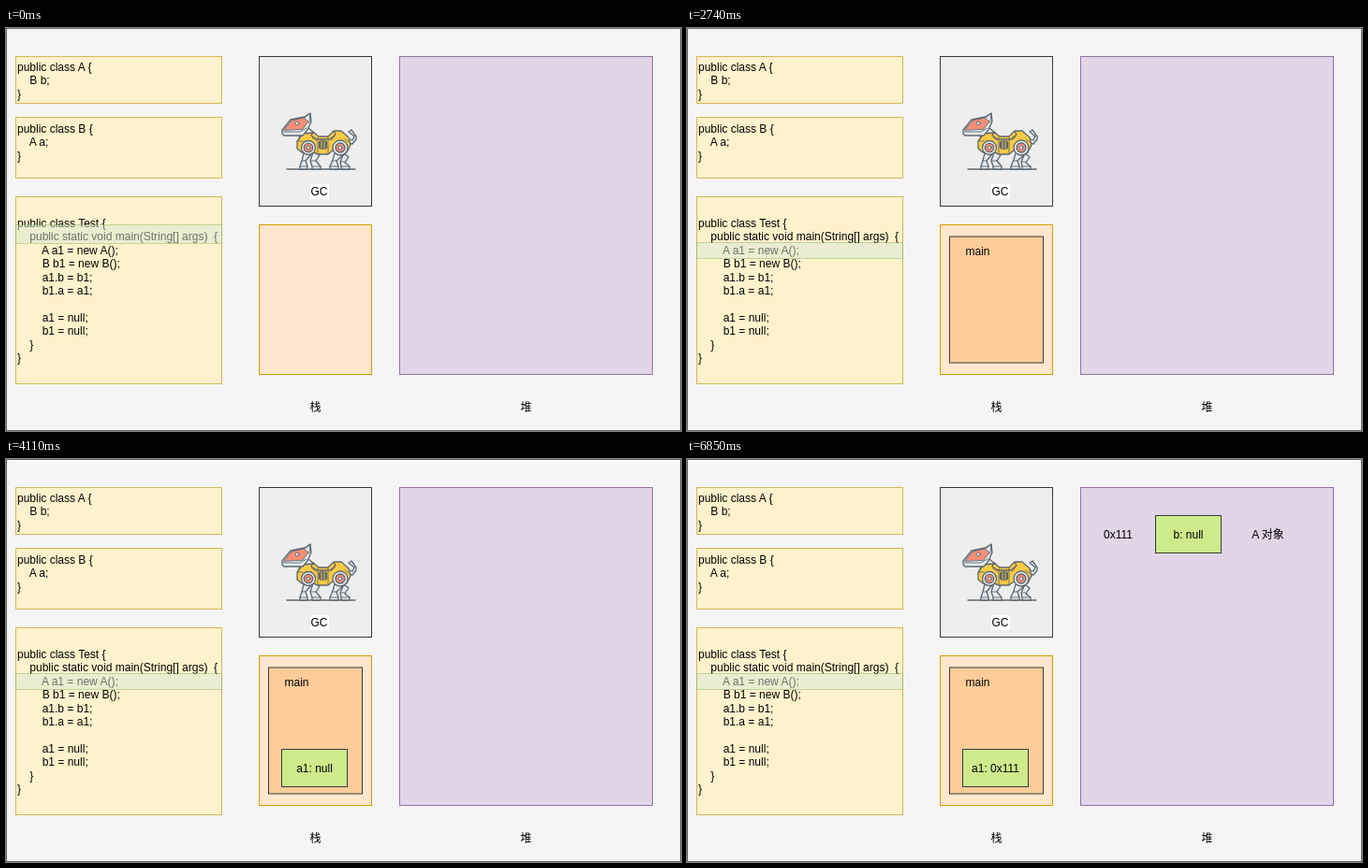
Animation of 721x431 px, one loop 8000 ms. Source, as an HTML page:

```html
<!DOCTYPE html>
<html lang="zh">
<head>
<meta charset="utf-8">
<title>GC</title>
<style>
  html, body { margin: 0; width: 100%; height: 100%; overflow: hidden; background: #f5f5f5; }
  svg { display: block; }
  text { font: 12px "Liberation Sans", "Noto Sans CJK SC", "Noto Sans CJK", sans-serif; white-space: pre; }
  #dog { stroke: #5d6770; stroke-width: 1.3; stroke-linejoin: round; stroke-linecap: round; fill: #e6eaed; }
  #dog .yellow { fill: #fbcb43; }
  #dog .coral { fill: #f58e76; }
  #dog .line { fill: none; }
  #dog .thin { stroke-width: .9; }
</style>
</head>
<body>
<svg id="stage" width="721" height="431" viewBox="0 0 721 431">
  <g id="back"></g>
  <g id="dog">
    <path class="line" d="M300 151H373"/>
    <!-- far legs -->
    <path d="M328 133L335 136 331 142 336 148V151H327V148L325 142Z"/>
    <path d="M361 134L366 138 362 144 367 148V151H358V148L357 143Z"/>
    <!-- tail -->
    <path d="M364 118L370 120 372 116 366 111 369 109 374 116 374 119 370 124 365 123Z"/>
    <!-- neck and body -->
    <path d="M314 112L323 107 329 112 325 119H313Z"/>
    <path class="yellow" d="M311 121L317 113 328 112 333 117H344L351 110H358L366 117 368 125 364 133 349 131 344 135H333L329 133 316 133 311 129Z"/>
    <path d="M328 111L334 116H344L350 110 352 114 346 119H332L326 115Z" class="yellow"/>
    <path class="line thin" d="M333 117V134M344 117V134M347 120L351 116M331 120L327 117M312 121H317M362 119L366 122"/>
    <rect x="334.5" y="121" width="8" height="8" rx="2" fill="#5d6770"/>
    <path class="thin" stroke="#fbcb43" d="M337 121.500V128.500M340 121.500V128.500"/>
    <!-- near legs -->
    <path d="M318 134L326 135 320 142 322 148V151H314V148L316 142Z"/>
    <path d="M351 134L360 136 353 142 355 148V151H346V148L349 141Z"/>
    <path class="line thin" d="M316 142H320M326 142H331M349 142H353M357 143H362M314 148H322M327 148H336M346 148H355M358 148H367"/>
    <!-- joints -->
    <circle cx="323" cy="128" r="7.500"/>
    <circle class="coral" cx="323" cy="128" r="4.700"/>
    <circle class="thin" cx="323" cy="128" r="1.900"/>
    <circle cx="357" cy="128" r="8"/>
    <circle class="coral" cx="357" cy="128" r="5"/>
    <circle class="thin" cx="357" cy="128" r="2"/>
    <!-- head -->
    <path d="M295 109L304 98 319 95 325 91 326 100 322 109 317 115H297L295 113Z"/>
    <path class="coral thin" d="M297 109L305 99 318 96 323 100 317 108Z"/>
    <path class="line thin" d="M296 111H314L321 107M319 96L325 91 324 101"/>
    <circle class="thin" cx="311" cy="102" r="1.900"/>
  </g>
  <g id="front"></g>
</svg>
<script>
const LOOP = 8000, STEP = 1370, LAST = 6;
const INK = '#36393d', GREEN = '#cdeb8b';
const back = document.getElementById('back'), front = document.getElementById('front');

function add(parent, tag, attrs, content = '') {
  const el = document.createElementNS('http://www.w3.org/2000/svg', tag);
  for (const key in attrs) el.setAttribute(key, attrs[key]);
  el.textContent = content;
  return parent.appendChild(el);
}

const box = (parent, x, y, width, height, fill, stroke, opacity = 1) =>
  add(parent, 'rect', { x: x + .5, y: y + .5, width, height, fill, stroke, opacity });

const label = (parent, x, y, s) => add(parent, 'text', { x, y, 'text-anchor': 'middle' }, s);

function code(x, y, h, base, lines) {
  box(back, x, y, 220, h, '#fff2cc', '#d6b656');
  lines.forEach((s, i) => add(back, 'text', { x: x + 2, y: base + Math.round(i * 14.4) }, s));
}

// Show a group from step `from` up to, not including, step `to`.
function during(from, to = LAST) {
  const g = add(front, 'g', {});
  const at = n => n === LAST ? 1 : n * STEP / LOOP;
  const frames = [[0, from === 0], [at(from), true], [at(to), to === LAST], [1, to === LAST]];
  g.animate(frames.map(([offset, on]) => ({ offset, opacity: +on, easing: 'steps(1, end)' })),
    { duration: LOOP, iterations: Infinity });
  return g;
}

box(back, 0, 0, 720, 430, '#f5f5f5', '#666');
code(10, 30, 50, 46, ['public class A {', '    B b;', '}']);
code(10, 95, 65, 112, ['public class B {', '    A a;', '}']);
code(10, 180, 200, 213, [
  'public class Test {',
  '    public static void main(String[] args)  {',
  '        A a1 = new A();',
  '        B b1 = new B();',
  '        a1.b = b1;',
  '        b1.a = a1;',
  '',
  '        a1 = null;',
  '        b1 = null;',
  '    }',
  '}']);
box(back, 270, 30, 120, 160, '#eee', INK);
add(back, 'rect', { x: 325, y: 167, width: 20, height: 16, fill: '#fff' });
label(back, 334.5, 179, 'GC');
box(back, 270, 210, 120, 160, '#ffe6cc', '#d79b00');
box(back, 420, 30, 270, 340, '#e1d5e7', '#9673a6');
label(back, 330.5, 410, '栈');
label(back, 555.5, 410, '堆');

const highlight = (g, y, h) => box(g, 10, y, 220, h, '#d5e8d4', '#82b366', .5);
highlight(during(0, 2), 210, 20);
highlight(during(2), 229, 17);

const main = during(1);
box(main, 280, 222.5, 100, 135, '#ffcc99', INK);
label(main, 310.5, 243, 'main');

box(during(3), 294, 310, 70, 40, GREEN, INK);
label(during(3, 5), 329.5, 335, 'a1: null');
label(during(5), 329.5, 335, 'a1: 0x111');

const heap = during(4);
box(heap, 500, 60, 70, 40, GREEN, INK);
label(heap, 535.5, 85, 'b: null');
label(heap, 460.5, 85, '0x111');
label(heap, 620.5, 85, 'A 对象');
</script>
</body>
</html>
```
